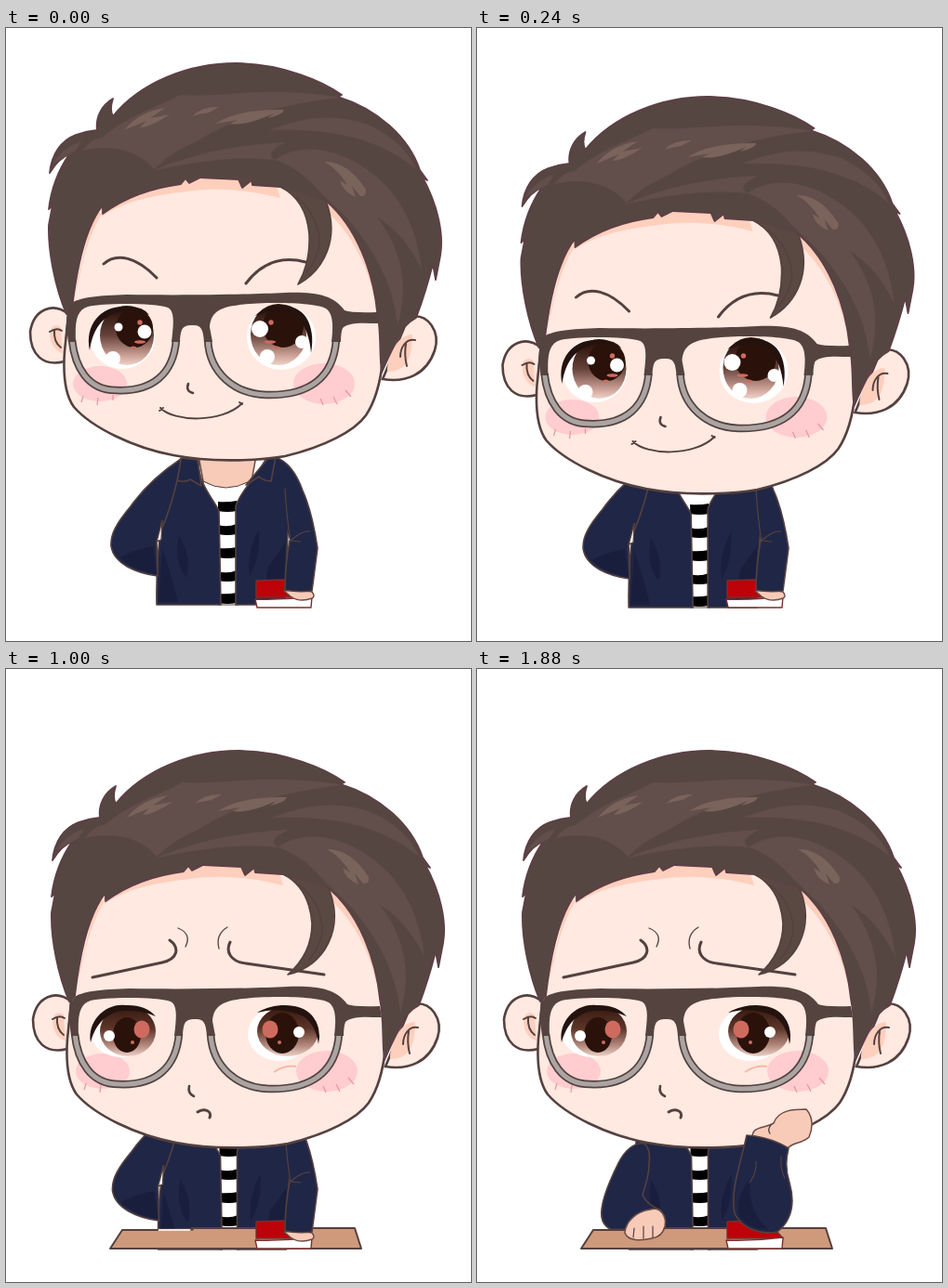
An HTML page that plays this animation: 500x660 px, repeating every 2 s.

```html
<!DOCTYPE html>
<html lang="en">
<head>
<meta charset="utf-8">
<title>Thinking at the desk</title>
<style>
html,body{margin:0;width:100%;height:100%;overflow:hidden;background:#fff}
svg{display:block;width:100vw;height:100vh}
.ln{fill:none;stroke:#54413f;stroke-linecap:round;stroke-linejoin:round}
.navy{fill:#202646;stroke:#54413f;stroke-width:1.6;stroke-linejoin:round}
.fold{fill:#1a1e3d}
.skin{fill:#f8cbb9;stroke:#6b4c47;stroke-width:1.5;stroke-linejoin:round}
.face{fill:#ffe9e1;stroke:#54413f;stroke-width:2.6}
.lite{fill:#624e4a}
.shine{fill:#7a635b}
.peach{fill:#ffcfbd}
.w{fill:#fff}
.red{fill:#cf6a5f}
.pupil{fill:#2a120b}
</style>
</head>
<body>
<svg viewBox="0 0 500 660">
<defs>
  <linearGradient id="iris" x1="0" y1="0" x2="0" y2="1">
    <stop offset=".1" stop-color="#2e150d"/><stop offset=".5" stop-color="#65423a"/>
    <stop offset=".85" stop-color="#cfa398"/><stop offset="1" stop-color="#efd3ca"/>
  </linearGradient>
  <linearGradient id="iris2" x1="0" y1="0" x2="0" y2="1">
    <stop offset="0" stop-color="#35190f"/><stop offset=".45" stop-color="#5d3529"/>
    <stop offset=".8" stop-color="#b88d82"/><stop offset="1" stop-color="#ecd2c9"/>
  </linearGradient>
</defs>

<g id="torso">
  <path class="skin" d="M206 455H270L264 488Q237 505 212 488Z"/>
  <path d="M212 488Q236 502 262 488L250 621H228Z" fill="#fff" stroke="#54413f" stroke-width="1"/>
  <g id="stripes"></g>
  <path class="navy" d="M188 464C174 474 168 500 168 530Q161 570 162 621H231Q230 560 229 520C222 505 207 492 207 466Z"/>
  <path class="navy" d="M288 461C300 470 303 490 304 520L300 621H247V515C252 498 268 486 280 463Z"/>
  <path class="fold" d="M186 546Q180 575 194 592Q200 570 186 546ZM168 560L164 618H185Q178 590 168 560ZM272 540Q258 565 262 590Q274 570 272 540ZM300 555L282 580L276 618H299Z"/>
  <path class="navy" d="M188 463L184 487Q192 490 198 486L210 493L206 465ZM290 462L285 488Q278 488 272 483L258 492L282 463Z"/>
  <g id="restArm">
    <path class="navy" d="M188 464C164 480 146 498 134 515C119 533 112 545 113 558C116 577 140 587 163 590L162 553L172 528Q184 495 188 464Z"/>
    <path class="fold" d="M122 570Q142 560 158 558L162 588Q136 584 122 570Z"/>
    <path d="M168 530L162 553L167 551Z" fill="#fff" stroke="#54413f" stroke-width="1.4"/>
  </g>
</g>

<g id="swingArm">
  <path id="swingHand" class="skin"/>
  <path id="swingSleeve" class="navy"/>
</g>

<g id="desk">
  <path d="M125 603L375 602L382 624H112Z" fill="#cf9a7c"/>
  <path class="ln" stroke-width="2" d="M163 604L125 604L112 624H382L375 602L200 602"/>
  <path d="M164 604H198" stroke="#fff" stroke-width="1.3"/>
  <circle cx="200" cy="603" r="1.8" fill="#54413f"/>
</g>

<g stroke="#7a2f2f" stroke-width="1.4" stroke-linejoin="round">
  <path d="M269 595L298 594L322 605L329 613H269Z" fill="#bd0209"/>
  <path d="M268 615Q298 616 329 612L328 624H270Z" fill="#fff"/>
</g>
<g id="deskHand">
  <path class="skin" id="frontHand"/>
  <path class="ln" id="knuckles" stroke-width="1.2" d="M169 602L168 612M179 600L179 613M189 600L189 612"/>
</g>

<g id="downArm">
  <path class="skin" d="M299 606Q316 604 329 607Q333 612 329 614Q316 619 306 612Z"/>
  <path class="navy" style="stroke:none" d="M290 462C306 468 314 484 319 498C328 518 332 540 335 560L329 606Q314 608 300 605Q300 578 305 552Q298 520 290 462Z"/>
  <path class="ln" stroke-width="1.6" d="M290 462C306 468 314 484 319 498C328 518 332 540 335 560L329 606Q314 608 300 605Q300 578 305 552"/>
  <path class="ln" stroke-width="1.2" d="M300 496Q302 530 306 552Q318 541 327 542M306 552L317 553"/>
</g>

<g id="head">
  <path class="face" d="M70 358C54 345 33 352 29 377C29 402 43 415 66 409Z"/>
  <path class="peach" d="M62 372C46 362 46 396 64 400Z"/>
  <path class="ln" stroke-width="2" d="M50 377Q58 372 63 376M55 375Q54 388 62 394"/>
  <path class="face" d="M436 361C458 356 470 378 464 397C455 424 432 432 408 428Z"/>
  <path class="peach" d="M440 380C422 380 412 408 413 420C434 420 440 404 440 380Z"/>
  <path class="ln" stroke-width="2" d="M443 386C433 384 427 394 427 404M433 390Q431 402 434 414"/>
  <path class="face" d="M76 240L71 350L66 398C64 426 68 447 76 458C95 480 140 502 183 510C220 517 268 517 303 511C345 501 378 484 390 467C402 449 406 428 408 408L400 240L300 180H130Z"/>
  <path class="peach" d="M106 253C130 236 165 230 190 227Q240 218 298 233L290 208L180 205L104 240ZM340 225C374 258 396 310 402 350L394 322C386 296 370 266 346 246ZM98 245L73 350L82 318Q90 276 106 250Z"/>

  <g fill="#ffcccf"><ellipse cx="104" cy="433" rx="29" ry="19"/><ellipse cx="345" cy="433" rx="33" ry="22"/></g>
  <path d="M86 446L84 453M102 448L101 456M118 445L118 451M341 449L344 456M355 447L359 455M368 440L374 447" stroke="#e89a9f" stroke-width="1.3"/>

  <path d="M50 206C52 186 62 171 78 165Q90 161 101 160C99 146 106 133 118 126Q114 138 118 145C148 108 200 88 250 88C300 88 345 108 364 122L360 124C402 137 436 167 448 203L456 214L451 211C467 240 474 272 470 295L465 321L462 304C457 324 451 343 444 362Q429 370 423 387Q415 402 407 421C404 400 407 380 402 355C398 315 381 265 347 236L298 221L268 219L267 214L257 222L253 213L212 211L200 217L196 212L191 218C160 222 130 233 107 250L107 241C90 262 80 300 74 352L68 358C56 330 48 290 49 262L53 241L49 245Q53 212 71 186Q60 190 50 206Z" fill="#564642" stroke="#5d3f45" stroke-width="1.8" stroke-linejoin="round"/>
  <path class="lite" d="M106 168C135 144 164 136 190 122C230 125 286 112 362 125C310 130 250 145 208 172Q180 184 162 202C146 183 118 174 85 182Q94 169 106 168ZM160 204C208 184 250 176 304 173Q280 184 292 192Q240 186 160 204ZM292 192C330 166 380 188 410 218Q443 252 450 310Q430 270 402 254C430 290 436 330 424 370Q418 310 370 255L340 226Q318 200 292 192ZM286 160C324 145 356 142 390 153Q430 170 444 202C410 174 365 157 286 160Z"/>
  <path class="lite" d="M54 196Q64 178 84 172L78 182Z"/>
  <path class="shine" d="M130 160Q146 140 174 136L158 147L179 143Q158 157 147 157L154 150ZM203 145Q214 134 232 135L221 141L210 143ZM228 153Q252 137 302 138Q300 144 284 147L291 142Q260 156 244 153L252 149ZM345 194Q370 193 390 224Q391 232 384 231L375 220L379 232Q365 226 362 214L370 219Q360 202 345 194Z"/>
  <path id="lock" fill="#5a4843"/>
  <path id="lockEdge" class="ln" stroke-width="1.6"/>
  <path class="ln" stroke-width="1.4" d="M315 232Q341 254 340 284Q337 300 326 313"/>

  <g id="happy" transform="translate(3 50)">
    <path class="ln" stroke-width="3" d="M105 254C119 241 141 247 162 269M258 275C276 251 299 246 322 252"/>
    <g id="eyesA"></g>
    <path class="ln" stroke-width="2.6" d="M196 383Q193 391 201 393"/>
    <path class="ln" stroke-width="2" d="M166 409C180 424 232 426 254 404M165 412L169 409M251 403L254 405"/>
  </g>
  <g id="sad">
    <path class="ln" stroke-width="3" d="M93 332L168 316C185 312 187 300 176 292M241 294C236 304 241 315 258 317L342 329"/>
    <path class="ln" stroke-width="1.3" d="M185 279Q200 285 193 299M238 278Q225 286 229 301"/>
    <path d="M288 434Q300 426 312 428" fill="none" stroke="#f5b9a5" stroke-width="2"/>
    <g id="eyesB"></g>
    <path class="ln" stroke-width="2.6" d="M197 449Q195 457 202 460"/>
    <path class="ln" stroke-width="3" d="M206 477C213 472 222 476 219 483"/>
  </g>
  <g id="glasses">
    <path class="ln" stroke-width="8.5" style="stroke-linecap:butt" d="M71 336C74 365 88 390 118 390C158 392 180 372 183 336M217 336C219 372 246 394 280 395C324 396 352 378 355 336"/>
    <path fill="none" stroke="#aaa5a3" stroke-width="5" d="M71 336C74 365 88 390 118 390C158 392 180 372 183 336M217 336C219 372 246 394 280 395C324 396 352 378 355 336"/>
    <path fill="#54433f" d="M67 338C65 325 64 305 70 297C77 290 100 288 130 287C190 288 260 287 300 285C335 284 352 288 364 304Q372 307 399 306L401 318C385 318 370 316 362 323Q360 328 360 338H350C352 320 352 308 344 302C335 295 270 294 245 299C225 302 220 310 219 322L222 338H213C212 325 210 320 202 320C190 320 188 322 187 338H178C180 320 182 305 174 301C160 296 105 296 88 300C76 304 74 315 75 338Z"/>
  </g>
</g>

<g id="chinArm">
  <path class="skin" d="M296 504C296 492 309 495 319 489C324 474 342 474 354 474C362 483 361 495 357 504C350 511 340 509 334 516Z"/>
  <path class="ln" stroke-width="1.3" d="M316 491Q312 496 315 500"/>
  <path class="navy" d="M290 502C284 530 272 562 277 586C284 602 306 610 323 606C340 592 342 574 336 553Q330 535 335 516Q316 504 290 502Z"/>
  <path class="fold" d="M294 548Q277 570 282 589Q294 605 312 602Q290 582 294 548Z"/>
  <path class="ln" stroke-width="1.2" d="M300 530Q301 543 293 553M327 525Q326 540 331 548"/>
</g>
</svg>
<script>
const $ = id => document.getElementById(id);
const clamp = v => Math.max(0, Math.min(1, v));
const dot = (cls, x, y, rx, ry = rx) =>
  `<ellipse class="${cls}" cx="${x}" cy="${y}" rx="${rx}" ry="${ry}"/>`;
const iris = (id, x, y, rx, ry) =>
  `<ellipse cx="${x}" cy="${y}" rx="${rx}" ry="${ry}" fill="url(#${id})"/>`;
const lash = d => `<path d="${d}" fill="#24120e"/>`;

$("stripes").innerHTML = [515, 540, 565, 590, 614].map((y, i) =>
  `<path d="M228 ${y - 5}Q238 ${y - 4 + i % 2 * 2} 248 ${y - 6}V${y + 5}Q238 ${y + 7} 228 ${y + 5}Z"/>`).join("");

$("eyesA").innerHTML =
  dot("w", 125, 333, 35, 34) + iris("iris", 130, 331, 29, 32) + dot("pupil", 138, 323, 20, 21) +
  lash("M90 347C84 318 104 297 132 300Q148 300 154 309Q137 301 119 306C100 313 93 328 90 347Z") +
  dot("w", 149, 327, 7.5) + dot("w", 121, 322, 4.5) + dot("w", 115, 356, 8) +
  dot("red", 144, 317, 2.7) + dot("red", 144, 338, 6, 1.7) + dot("red", 137, 344, 3, 1.5) +
  dot("w", 296, 333, 37, 35) + iris("iris", 293, 330, 30, 33) + dot("pupil", 298, 321, 22, 23) +
  lash("M268 310C282 294 312 295 323 312Q332 327 328 350Q326 325 313 310Q296 298 268 310Z") +
  dot("w", 273, 324, 9) + dot("w", 318, 338, 7) + dot("w", 281, 354, 8) +
  dot("red", 285, 317, 2.7) + dot("red", 284, 338, 6, 1.7) + dot("red", 291, 344, 3, 1.5);

$("eyesB").innerHTML =
  dot("w", 124, 391, 33, 27) + iris("iris2", 131, 390, 30, 27) + dot("pupil", 130, 394, 15, 19) +
  lash("M91 402C87 380 106 360 128 362Q150 361 161 374Q140 365 119 369C101 376 95 388 91 402Z") +
  dot("red", 146, 388, 8.5, 9.5) + dot("w", 111, 395, 6) + dot("red", 136, 402, 2) +
  dot("w", 294, 393, 34, 29) + iris("iris2", 303, 390, 33, 27) + dot("pupil", 297, 392, 18, 22) +
  lash("M270 370C290 358 318 360 329 373Q340 388 336 404Q333 383 320 374Q296 363 270 370Z") +
  dot("red", 284, 388, 8.5, 9.5) + dot("w", 315, 391, 6) + dot("red", 294, 402, 2);

const sleeve = [
  "M178 507C160 505 140 511 128 520C114 535 100 548 99 556C102 570 125 588 145 594C149 586 152 576 155 565C150 560 147 556 146 552C155 544 165 536 172 528C176 522 178 514 178 507Z",
  "M180 511C168 509 158 520 152 532C142 552 132 575 134 590C136 602 148 608 160 606C166 596 176 590 198 583C186 578 180 572 178 566C182 554 185 544 185 534C186 526 186 516 180 511Z"];
const hand = [
  "M147 594C150 584 150 570 156 565C162 562 166 568 165 575C166 584 164 590 158 592C154 595 150 596 147 594Z",
  "M159 607C160 594 172 584 186 582C198 578 204 590 202 600C200 608 196 612 188 613C176 616 162 616 159 607Z"];
const lock = [
  "M298 221C316 230 327 248 329 272C330 294 325 312 317 326C346 310 362 276 347 236",
  "M298 221C316 230 327 248 329 274C329 297 318 316 303 329C344 320 364 278 347 236"];

function morph([a, b], p) {
  const end = b.match(/\d+/g);
  let i = 0;
  return a.replace(/\d+/g, n => (+n + (end[i++] - n) * p).toFixed(1));
}
const show = (id, on) => $(id).setAttribute("display", on ? "inline" : "none");
const move = (id, x, y) => $(id).setAttribute("transform", `translate(${x} ${y})`);

function draw(ms) {
  const t = Math.floor(ms / 40) * 40;
  const drop = clamp(t / 320);
  const sad = t >= 440;

  move("head", sad ? 0 : -3 + 2 * drop, sad ? 0 : -50 + 48 * drop);
  move("torso", 1.5 * drop, 4 * drop);
  move("glasses", 3, sad ? 57 : 50);
  show("happy", !sad);
  show("sad", sad);
  for (const id of ["lock", "lockEdge"]) $(id).setAttribute("d", lock[+sad]);

  const slide = clamp((t - 720) / 280);
  move("desk", 268 * (1 - slide), 0);
  $("desk").setAttribute("opacity", slide);

  const swing = clamp((t - 1520) / 160), out = t >= 1520;
  show("restArm", !out);
  show("swingArm", out);
  show("deskHand", out && swing > .4);
  show("knuckles", swing > .7);
  $("swingSleeve").setAttribute("d", morph(sleeve, swing));
  for (const id of ["swingHand", "frontHand"]) $(id).setAttribute("d", morph(hand, swing));

  const lift = clamp((t - 1720) / 160), up = t >= 1720;
  show("downArm", !up);
  show("chinArm", up);
  $("chinArm").setAttribute("transform", `rotate(${-35 * (1 - lift)} 310 605)`);
}

const start = performance.now();
function tick() {
  draw((performance.now() - start) % 2000);
  requestAnimationFrame(tick);
}
tick();
</script>
</body>
</html>
```
